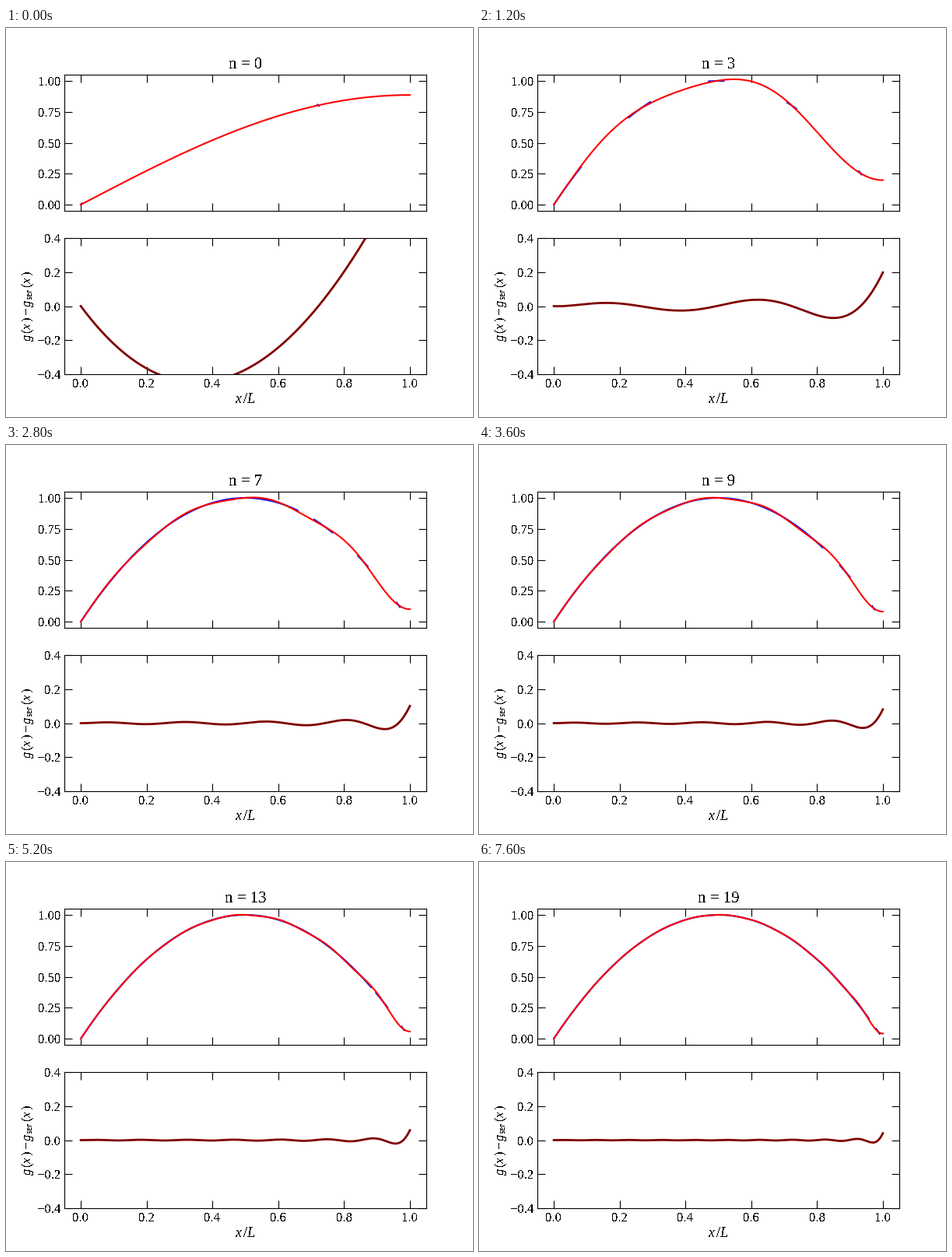
A matplotlib script that plays this animation: 600x500 px, repeating every 8000 ms.

```python
import numpy as np
import matplotlib.pyplot as plt
from matplotlib.animation import FuncAnimation

plt.rcParams.update({
    "font.family": "Liberation Serif",
    "font.size": 12,
    "mathtext.fontset": "custom",
    "mathtext.rm": "Liberation Serif",
    "mathtext.it": "Liberation Serif:italic",
    "text.antialiased": False,
    "xtick.direction": "in",
    "ytick.direction": "in",
    "xtick.top": True,
    "ytick.right": True,
    "xtick.major.size": 7,
    "ytick.major.size": 7,
})

FRAMES = 20
INTERVAL = 400

x = np.linspace(0, 1, 400)
parabola = 4 * x * (1 - x)


def series(last):
    """Partial sum of the quarter-wave sine series of 4x(1 - x)."""
    n = np.arange(last + 1)
    k = (n + 0.5) * np.pi
    coeffs = 16 / k**3 - 8 * (-1.0)**n / k**2
    return coeffs @ np.sin(np.outer(k, x))


fig, (top, bottom) = plt.subplots(2, 1, sharex=True, figsize=(6, 5), dpi=100)
top.set(xlim=(-0.05, 1.05), ylim=(-0.05, 1.05), yticks=np.arange(0, 1.1, 0.25))
bottom.set(ylim=(-0.4, 0.4), yticks=np.arange(-0.4, 0.5, 0.2))
bottom.set_xticks(np.arange(0, 1.1, 0.2))
top.yaxis.set_major_formatter("{x:.2f}")

exact_line, = top.plot([], [], color="blue", lw=1.5)
series_line, = top.plot([], [], color="red", lw=1.5)
error_line, = bottom.plot([], [], color="maroon", lw=2)
title = top.set_title("", fontsize=15)

fig.text(307.5 / 600, 1 - 478 / 500, r"$x\,/L$", fontsize=13,
         ha="center", va="center")
fig.text(28 / 600, 1 - 357 / 500,
         r"$g\,(x\,)-g_{\mathrm{ser}}\,(x\,)$",
         rotation=90, ha="center", va="center")


def update(n):
    approx = series(n)
    error = approx - parabola
    # The exact curve only shows as a fringe where both curves meet.
    exact_line.set_data(x, np.where(np.abs(error) < 0.01, parabola, np.nan))
    series_line.set_data(x, approx)
    error_line.set_data(x, error)
    title.set_text(f"n = {n}")
    return exact_line, series_line, error_line, title


anim = FuncAnimation(fig, update, frames=FRAMES, interval=INTERVAL,
                     repeat=True, repeat_delay=0, blit=False)
plt.show()
```
